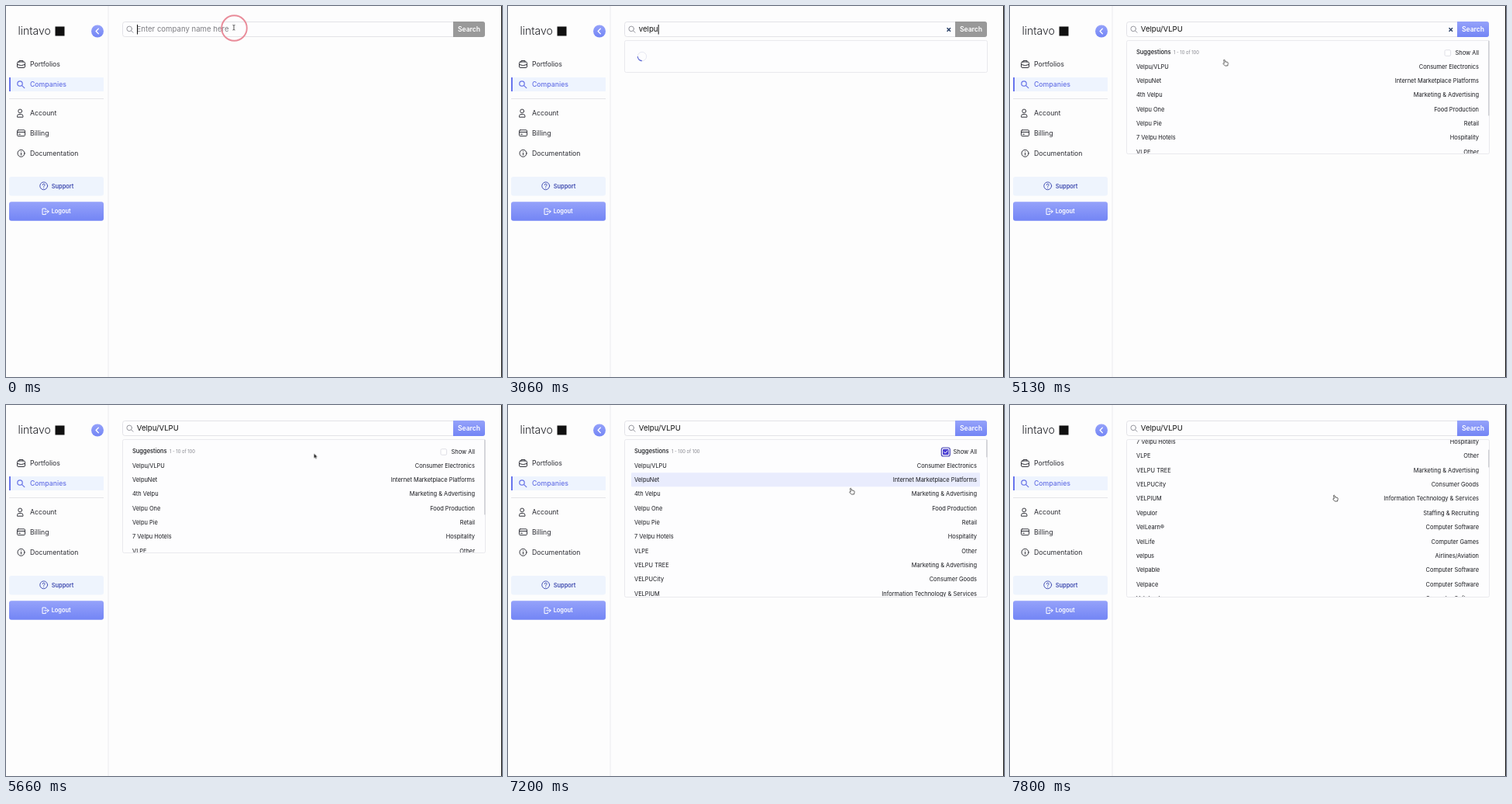
An HTML page that plays this animation: 640 px wide and 478 px high, repeating every 8000 ms.

```html
<!DOCTYPE html>
<html lang="en">
<head>
<meta charset="utf-8">
<title>Company search</title>
<style>
html, body { margin: 0; width: 100%; height: 100%; overflow: hidden; background: #fdfdfd; }
svg { display: block; width: 100%; height: 100%; font-family: Inter, "Open Sans", sans-serif; }
text { white-space: pre; }
.nav { font-size: 8.7px; fill: #2b2c33; }
.field { font-size: 9.6px; }
.list { font-size: 7.45px; fill: #17181d; }
.btn { font-size: 7.4px; font-weight: 600; }
.end { text-anchor: end; }
.icon { fill: none; stroke: #33343c; stroke-width: 1; stroke-linecap: round; stroke-linejoin: round; }

#cursor { animation: move 8s linear infinite; }
#ring { animation: press 8s linear infinite; }
#arc { animation: spin .8s linear infinite; transform-origin: 173px 65px; }
#scroll { animation: scroll 8s linear infinite; }
#thumb { animation: thumb 8s linear infinite; }

@keyframes move {
  0%, 49.1% { transform: translate(294px, 28px); }
  53.25%, 63.25% { transform: translate(276.5px, 75px); }
  64.1% { transform: translate(276px, 69px); }
  67.5% { transform: translate(302px, 64px); }
  73.25% { transform: translate(470px, 61px); }
  75% { transform: translate(482px, 61px); }
  80.75%, 87.5% { transform: translate(565.5px, 60px); }
  90% { transform: translate(442px, 107px); }
  93.25%, 100% { transform: translate(418px, 116px); }
}
@keyframes press {
  0%, .75% { opacity: 1; }
  5%, 54.1% { opacity: 0; }
  54.2%, 55.4% { opacity: 1; }
  56.6%, 82.45% { opacity: 0; }
  82.5%, 85.75% { opacity: 1; }
  88%, 100% { opacity: 0; }
}
@keyframes spin { to { transform: rotate(360deg); } }
@keyframes scroll {
  0%, 94.5% { transform: translateY(0); }
  95.25% { transform: translateY(-24px); }
  96.25% { transform: translateY(-62px); }
  97.5%, 100% { transform: translateY(-122.3px); }
}
@keyframes thumb {
  0%, 94.5% { transform: translateY(0); }
  97.5%, 100% { transform: translateY(13px); }
}
</style>
</head>
<body>
<svg viewBox="0 0 640 478">
  <defs>
    <linearGradient id="blue" x2="0" y2="1">
      <stop stop-color="#95a2fa"/><stop offset="1" stop-color="#7385f5"/>
    </linearGradient>
    <clipPath id="clip"><rect id="clipBox" x="151" y="45" width="467" height="145"/></clipPath>
  </defs>

  <!-- Sidebar -->
  <path d="M132 0V478" stroke="#ebebef"/>
  <text x="15.5" y="37.3" font-size="14" font-weight="300" fill="#24252b">lintavo</text>
  <rect x="63.5" y="26.5" width="12" height="12" fill="#111"/>
  <circle cx="118" cy="32.5" r="8" fill="url(#blue)"/>
  <path class="icon" d="M119.3 29.3L116.1 32.5L119.3 35.7" style="stroke:#fff;stroke-width:1.3"/>

  <rect x="4" y="92" width="122" height="18" rx="1" fill="#eef4fe"/>
  <rect x="4" y="92" width="2" height="18" fill="#6875ee"/>
  <path d="M4 119.5H126" stroke="#e4e4e8"/>
  <g class="nav">
    <text x="31" y="78.2">Portfolios</text>
    <text x="31" y="103.9" font-weight="500" fill="#6672e6">Companies</text>
    <text x="31" y="141.2">Account</text>
    <text x="31" y="167.1">Billing</text>
    <text x="31" y="193.1">Documentation</text>
  </g>
  <g class="icon">
    <path d="M17 72V70.5H22V72M14.5 75.5Q19.5 78 24.5 75.5"/>
    <rect x="14.5" y="72" width="10" height="7.5" rx="1.4"/>
    <g stroke="#6672e6" stroke-width="1.2"><circle cx="18" cy="100" r="3.2"/><path d="M20.4 102.4L23.8 105.6"/></g>
    <circle cx="18.2" cy="135.4" r="2.4"/>
    <path d="M14.6 142.8V141.6Q14.8 139.5 17 139.5H19.4Q21.7 139.5 21.9 141.6V142.8Z"/>
    <rect x="14.5" y="159.8" width="10" height="7.8" rx="1.3"/>
    <path d="M14.5 162.5H24.5M16.5 165.2H18.5"/>
    <circle cx="19.5" cy="189.8" r="4.5"/><path d="M19.5 189.4V192M19.5 187.6V187.7"/>
  </g>

  <rect x="4" y="220" width="122" height="24.5" rx="3" fill="#eef4fd"/>
  <g class="icon" style="stroke:#4450b4">
    <circle cx="48.7" cy="231.8" r="4.9"/>
    <path d="M47.2 230.6Q47.3 229.2 48.7 229.2T50.2 230.6Q50.2 231.4 48.7 232.2V232.7M48.7 234.4V234.5"/>
  </g>
  <text class="btn" x="58.7" y="234.5" fill="#414db0">Support</text>
  <rect x="4" y="252.3" width="122" height="24.5" rx="3" fill="url(#blue)"/>
  <path class="icon" d="M51.3 262.4V261H47V268.6H51.3V267.2M49.6 264.8H55M53.2 262.8L55.2 264.8L53.2 266.8" style="stroke:#fff"/>
  <text class="btn" x="58.7" y="267.4" fill="#fff">Logout</text>

  <!-- Search bar -->
  <rect x="150.5" y="20.5" width="467" height="19" rx="3" fill="#fdfdfe" stroke="#e3e3e7"/>
  <g class="icon" style="stroke:#8b8c94;stroke-width:.9"><circle cx="159.2" cy="29.4" r="3.3"/><path d="M161.7 31.9L164 34.3"/></g>
  <text class="field" id="placeholder" x="168.5" y="33.2" fill="#7d7d82">Enter company name here</text>
  <text class="field" id="query" x="168.8" y="33.2" fill="#111"></text>
  <rect id="caret" y="24" width="1" height="12.5" fill="#111"/>
  <path id="clear" d="M566.5 28.2L571 32.8M571 28.2L566.5 32.8" stroke="#2b4168" stroke-width="1.5"/>
  <path id="button" d="M577 20H615Q618 20 618 23V37Q618 40 615 40H577Z"/>
  <text x="597.5" y="33" text-anchor="middle" font-size="8.6" font-weight="600" fill="#fff">Search</text>

  <!-- Loading -->
  <g id="loading" fill="none">
    <rect x="150.5" y="44.5" width="468" height="41" rx="2" fill="#fdfdfe" stroke="#e9e9ed"/>
    <circle cx="173" cy="65" r="5.7" stroke="#e8e9f3"/>
    <g id="arc"><path d="M167.3 65A5.7 5.7 0 0 0 173 70.7" transform="rotate(63 173 65)" stroke="#6570d6" stroke-width="1.2"/></g>
  </g>

  <!-- Suggestions -->
  <g id="panel">
    <rect id="frame" x="150.5" y="44.5" width="468" height="146" rx="2" fill="#fdfdfe" stroke="#e9e9ed"/>
    <g clip-path="url(#clip)">
      <g id="scroll" class="list">
        <rect id="hover" x="159" width="450" height="18.2" rx="1" fill="#e9ecfd"/>
        <text x="163" y="62.4" font-size="7.5" font-weight="500">Suggestions</text>
        <text id="count" x="211" y="62.2" font-size="5.8" fill="#84858c"></text>
        <text class="end" x="605" y="63.2">Show All</text>
        <rect x="561" y="56.7" width="7.6" height="7.6" rx="1.5" fill="#fff" stroke="#dcdce4" stroke-width=".9"/>
        <rect id="focus" x="559.3" y="55" width="11" height="11" rx="2.6" fill="#fff" stroke="#4a48b5" stroke-width="1.2"/>
        <g id="check">
          <rect x="561" y="56.7" width="7.6" height="7.6" rx="1.3" fill="#4b3fd3"/>
          <path class="icon" d="M562.8 60.6L564.3 62.1L567 59" style="stroke:#fff"/>
        </g>
        <g id="rows"></g>
      </g>
    </g>
    <g id="thumb"><rect id="bar" x="617" y="44.5" width="1.5" rx=".7" fill="#cfd0d5"/></g>
  </g>

  <path d="M639.5 0V478" stroke="#111"/>

  <!-- Pointer -->
  <g id="cursor">
    <circle id="ring" cx=".5" cy=".5" r="16.3" fill="none" stroke="#e98b99" stroke-width="1.9"/>
    <path id="ibeam" d="M-1.5 -3.5Q0 -3.5 0 -2.5Q0 -3.5 1.5 -3.5M0 -2.5V2M-1.5 3Q0 3 0 2Q0 3 1.5 3" fill="none" stroke="#333" stroke-width=".8"/>
    <path id="arrow" d="M0 0V6.5L1.5 5.2L2.5 7.3L3.6 6.8L2.6 4.8H4.6Z" fill="#111" stroke="#fff" stroke-width=".5"/>
    <path id="hand" d="M-.5 .6Q.3 -.4 1 .8L1.8 3L4.3 3.3Q5.4 3.8 5.1 5.4L4.5 8H1.3L-1.2 5.6Q-1.5 4.4 .3 4.6Z" fill="#fff" stroke="#333" stroke-width=".8" stroke-linejoin="round"/>
  </g>
</svg>

<script>
const LOOP = 8000, PITCH = 18.36;
const $ = id => document.getElementById(id);

const companies = [
  ["Velpu/VLPU", "Consumer Electronics"],
  ["VelpuNet", "Internet Marketplace Platforms"],
  ["4th Velpu", "Marketing & Advertising"],
  ["Velpu One", "Food Production"],
  ["Velpu Pie", "Retail"],
  ["7 Velpu Hotels", "Hospitality"],
  ["VLPE", "Other"],
  ["VELPU TREE", "Marketing & Advertising"],
  ["VELPUCity", "Consumer Goods"],
  ["VELPIUM", "Information Technology & Services"],
  ["Vepulor", "Staffing & Recruiting"],
  ["VelLearn®", "Computer Software"],
  ["VelLife", "Computer Games"],
  ["velpus", "Airlines/Aviation"],
  ["Velpable", "Computer Software"],
  ["Velpace", "Computer Software"],
  ["Velpland", "Computer Software"]
];

function addText(x, y, value, cls) {
  const node = document.createElementNS("http://www.w3.org/2000/svg", "text");
  node.setAttribute("x", x);
  node.setAttribute("y", y);
  node.setAttribute("class", cls);
  node.textContent = value;
  $("rows").append(node);
}
companies.forEach(([name, sector], i) => {
  const y = 80.5 + i * PITCH;
  addText(163, y, name, "");
  addText(605, y, sector, "end");
});

// Time windows in which each part is visible
const windows = {
  placeholder: [[0, 1060]],
  ibeam: [[0, 1060]],
  hand: [[3930, 5260], [7060, LOOP]],
  arrow: [[5260, 7060]],
  caret: [[0, 530], [800, 2460], [2990, 3520], [4050, 4400]],
  clear: [[1060, 5500]],
  loading: [[1930, 3800]],
  panel: [[3800, LOOP]],
  focus: [[6600, LOOP]],
  check: [[6860, LOOP]],
  hover: [[4130, 5100], [7060, 7600]]
};

// Values that hold from their time on
const queries = [[0, ""], [1060, "v"], [1200, "ve"], [1460, "vel"], [1660, "velp"], [1860, "velpu"], [4400, "Velpu/VLPU"]];
const hovers = [[0, 0], [7130, 1], [7330, 2]];
const at = (steps, t) => steps.findLast(([start]) => start <= t)[1];

function render(t) {
  for (const id in windows) {
    const on = windows[id].some(([a, b]) => t >= a && t < b);
    $(id).style.display = on ? "" : "none";
  }
  const query = $("query"), text = at(queries, t), expanded = t >= 6860;
  if (query.textContent !== text) query.textContent = text;
  $("caret").setAttribute("x", 169 + (text && query.getComputedTextLength()));
  $("button").setAttribute("fill", t >= 4400 ? "url(#blue)" : "#999");
  $("hover").setAttribute("y", 68.8 + at(hovers, t) * PITCH);
  $("count").textContent = `1 - ${expanded ? 100 : 10} of 100`;
  $("frame").setAttribute("height", expanded ? 203 : 146);
  $("clipBox").setAttribute("height", expanded ? 202 : 145);
  $("bar").setAttribute("height", expanded ? 23 : 97);
}

let start;
function tick(now) {
  start ??= now;
  render((now - start) % LOOP);
  requestAnimationFrame(tick);
}
render(0);
requestAnimationFrame(tick);
</script>
</body>
</html>
```
